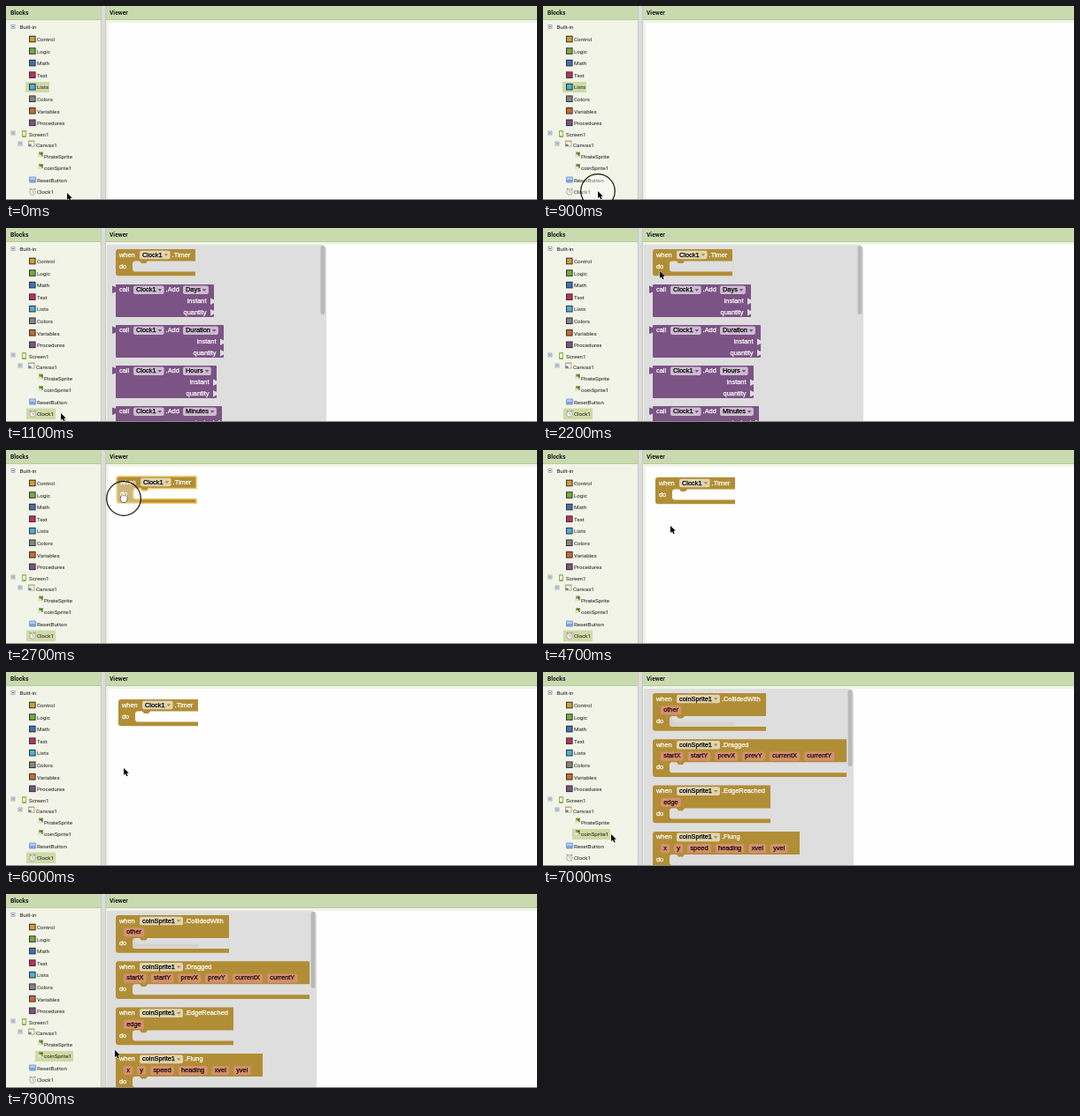
An HTML page with a canvas for the animation above (8000 ms loop, 600 px wide and 220 px high).

```html
<!DOCTYPE html>
<html lang="en">
<head>
<meta charset="utf-8">
<title>Block editor</title>
<style>
html, body { margin: 0; width: 100%; height: 100%; overflow: hidden; background: #fff; }
canvas { display: block; }
</style>
</head>
<body>
<canvas id="stage" width="600" height="220"></canvas>
<script>
const ctx = document.getElementById('stage').getContext('2d');
const LOOP = 8000, STEP = 100;
const GOLD = '#b18e35', PURPLE = '#7c5385';
const UI = '6.2px Roboto, sans-serif';
const HEAD = 'bold 6.7px Roboto, sans-serif';
const BLOCK = '7.4px "Liberation Sans", Arial, sans-serif';

// Moments at which the editor changes state
const CLOCK_OPEN = 1000, GRAB = 2300, DRAG = 2600, DROP = 3200, DESELECT = 4400, COIN_OPEN = 6800;

const drawers = [
  ['Control', '#d0a02f'], ['Logic', '#77ab41'], ['Math', '#3f71b5'], ['Text', '#c22d5e'],
  ['Lists', '#49b0dc'], ['Colors', '#858585'], ['Variables', '#d0682d'], ['Procedures', PURPLE]
];
const clockCalls = [['Days', 235], ['Duration', 246], ['Hours', 238], ['Minutes', 244]];
const spriteEvents = [
  ['CollidedWith', 252, ['other']],
  ['Dragged', 343, ['startX', 'startY', 'prevX', 'prevY', 'currentX', 'currentY']],
  ['EdgeReached', 257, ['edge']],
  ['Flung', 290, ['x', 'y', 'speed', 'heading', 'xvel', 'yvel']]
];
// Pointer path: time, x, y
const path = [
  [0, 69, 212], [700, 62, 210], [1200, 62, 210], [2200, 132, 49], [2500, 132, 49],
  [2700, 133, 55], [3000, 135, 56], [DROP, 135, 56], [4200, 144, 86], [4700, 144, 86],
  [6000, 133, 109], [6600, 77, 184], [7100, 77, 184], [7900, 123, 177]
];
const presses = [
  [CLOCK_OPEN - 200, CLOCK_OPEN], [GRAB, DROP], [DESELECT - 200, DESELECT], [COIN_OPEN - 200, COIN_OPEN]
];

const within = (t, a, b) => t >= a && t < b;

function pointerAt(t) {
  const i = path.findIndex(p => p[0] > t);
  if (i < 0) return path[path.length - 1].slice(1);
  const [t0, x0, y0] = path[i - 1], [t1, x1, y1] = path[i];
  const u = (t - t0) / (t1 - t0), k = u * u * (3 - 2 * u);
  return [x0 + (x1 - x0) * k, y0 + (y1 - y0) * k];
}

function rect(x, y, w, h, fill) {
  ctx.fillStyle = fill;
  ctx.fillRect(x, y, w, h);
}

function round(x, y, w, h, r, fill) {
  ctx.beginPath();
  ctx.roundRect(x, y, w, h, r);
  ctx.fillStyle = fill;
  ctx.fill();
}

function poly(points, fill) {
  ctx.beginPath();
  points.forEach(([x, y]) => ctx.lineTo(x, y));
  ctx.closePath();
  ctx.fillStyle = fill;
  ctx.fill();
}

function label(text, x, y, font = UI, fill = '#1a1a1a', align = 'left') {
  ctx.font = font;
  ctx.textAlign = align;
  ctx.fillStyle = fill;
  ctx.fillText(text, x, y);
}

function blockText(text, x, y, fill = '#fff', align = 'left') {
  label(text, x, y, BLOCK, fill, align);
  ctx.lineWidth = 0.25;
  ctx.strokeStyle = fill;
  ctx.strokeText(text, x, y);
}

function blockTextWidth(text) {
  ctx.font = BLOCK;
  return ctx.measureText(text).width;
}

// Draws a drop-down field and returns its right edge.
function field(text, x, y, arrow) {
  const w = blockTextWidth(text) + 12;
  round(x, y - 4.8, w, 9.6, 2, 'rgba(255,255,255,.62)');
  blockText(text, x + 3, y, '#000');
  poly([[x + w - 7, y - 1.2], [x + w - 2.5, y - 1.2], [x + w - 4.75, y + 1.6]], arrow);
  return x + w;
}

function eventBlock(x, y, right, owner, name, params = [], selected = false) {
  const top = y + (params.length ? 26 : 13.5), low = top + 12, end = low + 4.7;
  ctx.beginPath();
  ctx.moveTo(x + 3, y);
  ctx.lineTo(right, y);
  ctx.lineTo(right, top);
  [[36, 0], [34, 2.6], [29, 2.6], [27, 0], [22, 0]].forEach(([dx, dy]) => ctx.lineTo(x + dx, top + dy));
  ctx.quadraticCurveTo(x + 19, top, x + 19, top + 3);
  ctx.lineTo(x + 19, low - 3);
  ctx.quadraticCurveTo(x + 19, low, x + 22, low);
  ctx.lineTo(right, low);
  ctx.lineTo(right, end);
  ctx.lineTo(x + 3, end);
  ctx.quadraticCurveTo(x, end, x, end - 3);
  ctx.lineTo(x, y + 3);
  ctx.quadraticCurveTo(x, y, x + 3, y);
  ctx.closePath();
  ctx.fillStyle = GOLD;
  ctx.fill();
  if (selected) {
    ctx.strokeStyle = '#f0c662';
    ctx.lineWidth = 1.5;
    ctx.stroke();
  }
  blockText('when', x + 4, y + 6.5);
  blockText('.' + name, field(owner, x + 27, y + 6.5, GOLD) + 2, y + 6.5);
  let px = x + 9;
  for (const p of params) {
    const w = blockTextWidth(p) + 6.4;
    round(px, y + 14.2, w, 10.2, 2, '#d68f70');
    blockText(p, px + 3.2, y + 19, '#1c0e08');
    px += w + 5;
  }
  blockText('do', x + 4, top + 6);
}

function callBlock(y, unit, right) {
  round(124, y, right - 124, 37, 1, PURPLE);
  poly([[124, y + 3], [120, y + 1.5], [120, y + 10], [124, y + 8.5]], PURPLE);
  const row = y + 6.3;
  blockText('call', 128, row);
  blockText('.Add', field('Clock1', 144, row, PURPLE) + 2, row);
  field(unit, 200, row, PURPLE);
  ['instant', 'quantity'].forEach((name, i) => {
    const cy = y + 19 + i * 12.5;
    blockText(name, right - 8.5, cy, '#fff', 'right');
    poly([[right, cy - 1.5], [right - 4, cy - 3.5], [right - 4, cy + 4], [right, cy + 2]], '#dedede');
  });
}

function flyout(right, barEnd) {
  round(114, 19, right - 114, 202, [0, 6, 0, 0], 'rgba(219,219,219,.9)');
  round(right - 6.5, 20, 5, barEnd - 20, 2.5, '#b9b9b9');
}

function toggle(x, y) {
  ctx.strokeStyle = '#8b93b5';
  ctx.lineWidth = 0.7;
  ctx.strokeRect(x - 2, y - 2, 4, 4);
  rect(x - 1.2, y - 0.4, 2.4, 0.8, '#445');
}

function spriteIcon(y) {
  rect(37, y - 4, 5, 5, '#8aa351');
  rect(36, y - 1, 4, 3, '#e3e4c2');
  rect(39, y - 3, 2, 2, '#4c6d35');
}

function tree(selected) {
  const highlight = {
    Lists: [22, 86, 27, 12], Clock1: [23, 204.5, 33, 12.5], coinSprite1: [33, 178, 43, 12]
  }[selected];
  rect(...highlight, '#cfdaa6');
  toggle(8, 23.5);
  label('Built-in', 15.5, 24.5);
  drawers.forEach(([name, color], i) => {
    const y = 38 + i * 13.55;
    rect(26, y - 4.3, 7.6, 7.6, '#333');
    rect(27, y - 3.3, 5.6, 5.6, color);
    label(name, 35, y + 0.4);
  });
  toggle(8, 144);
  round(18, 141, 5, 8, 1, '#8fb552');
  rect(19, 142.5, 3, 4.5, '#eef5dc');
  label('Screen1', 26, 146);
  toggle(16, 156);
  rect(25, 152.5, 7.5, 7, '#c3a964');
  rect(26, 154, 5.5, 4.5, '#f3f3ff');
  rect(25.5, 156.5, 3, 2.5, '#5782bd');
  label('Canvas1', 34, 158);
  spriteIcon(169.5);
  label('PirateSprite', 43, 170.8);
  spriteIcon(183);
  label('coinSprite1', 43, 184.5);
  round(26, 193.5, 8, 7, 1, '#7ea0dc');
  rect(27, 194.5, 6, 2.5, '#b4caf0');
  label('ResetButton', 35, 198);
  ctx.beginPath();
  ctx.arc(30, 211, 3.3, 0, 7);
  ctx.fillStyle = '#f7f7f1';
  ctx.fill();
  ctx.strokeStyle = '#999a91';
  ctx.lineWidth = 0.8;
  ctx.moveTo(30, 209);
  ctx.lineTo(30, 211.3);
  ctx.lineTo(31.5, 211.3);
  ctx.stroke();
  rect(26.5, 206.8, 2, 1.2, '#999a91');
  rect(31.5, 206.8, 2, 1.2, '#999a91');
  label('Clock1', 35, 211.4);
}

function panels() {
  rect(0, 0, 600, 220, '#f1f4e7');
  rect(0, 0, 600, 16, '#c9dbae');
  rect(0, 15, 600, 1, '#b8caa0');
  rect(107, 0, 6, 220, '#dcdcdc');
  rect(107, 0, 1, 220, '#c6c9c0');
  rect(112, 0, 1, 220, '#c6c9c0');
  rect(116, 19, 484, 201, '#fefefe');
  label('Blocks', 5, 8.5, HEAD);
  label('Viewer', 117, 8.5, HEAD);
}

function pressRing(x, y) {
  ctx.beginPath();
  ctx.arc(x, y, 19.3, 0, 7);
  ctx.fillStyle = 'rgba(255,255,255,.35)';
  ctx.fill();
  ctx.strokeStyle = '#111';
  ctx.lineWidth = 1.2;
  ctx.stroke();
}

function pointer(x, y, grabbing) {
  ctx.save();
  ctx.translate(x, y);
  ctx.beginPath();
  if (grabbing) {
    ctx.moveTo(-2, 4);
    ctx.lineTo(-3.8, 0.5);
    ctx.lineTo(-3, -1);
    for (let i = 0; i < 4; i++) ctx.arc(-2 + i * 1.6, -2, 0.9, Math.PI, 0);
    ctx.lineTo(3.6, 1.5);
    ctx.lineTo(2.4, 4);
    ctx.fillStyle = '#fff';
    ctx.strokeStyle = '#111';
  } else {
    [[0, 0], [0, 8], [1.9, 6.3], [3.2, 9.3], [4.6, 8.7], [3.4, 5.8], [5.8, 5.8]]
      .forEach(p => ctx.lineTo(...p));
    ctx.fillStyle = '#000';
    ctx.strokeStyle = '#fff';
  }
  ctx.closePath();
  ctx.lineWidth = 1;
  ctx.stroke();
  ctx.fill();
  ctx.restore();
}

function draw(t) {
  const [x, y] = pointerAt(t);
  ctx.textBaseline = 'middle';
  panels();
  tree(t < CLOCK_OPEN ? 'Lists' : t < COIN_OPEN ? 'Clock1' : 'coinSprite1');

  if (t >= DRAG) {
    const [bx, by] = pointerAt(Math.min(t, DROP));
    eventBlock(bx - 8, by - 25, bx + 82, 'Clock1', 'Timer', [], t < DESELECT);
  }
  if (within(t, CLOCK_OPEN, DRAG)) {
    flyout(362, 98);
    eventBlock(124, 24, 214, 'Clock1', 'Timer');
    clockCalls.forEach(([unit, right], i) => callBlock(64 + i * 46, unit, right));
  }
  if (t >= COIN_OPEN) {
    flyout(351, 107);
    spriteEvents.forEach(([name, right, params], i) =>
      eventBlock(124, 24 + i * 52.3, right, 'coinSprite1', name, params));
  }
  rect(0, 219, 600, 1, '#85857f');
  if (presses.some(([a, b]) => within(t, a, b))) pressRing(x, y);
  pointer(x, y, within(t, GRAB, DROP));
}

function frame(now) {
  draw(Math.floor(now % LOOP / STEP) * STEP);
  requestAnimationFrame(frame);
}
requestAnimationFrame(frame);
</script>
</body>
</html>
```
